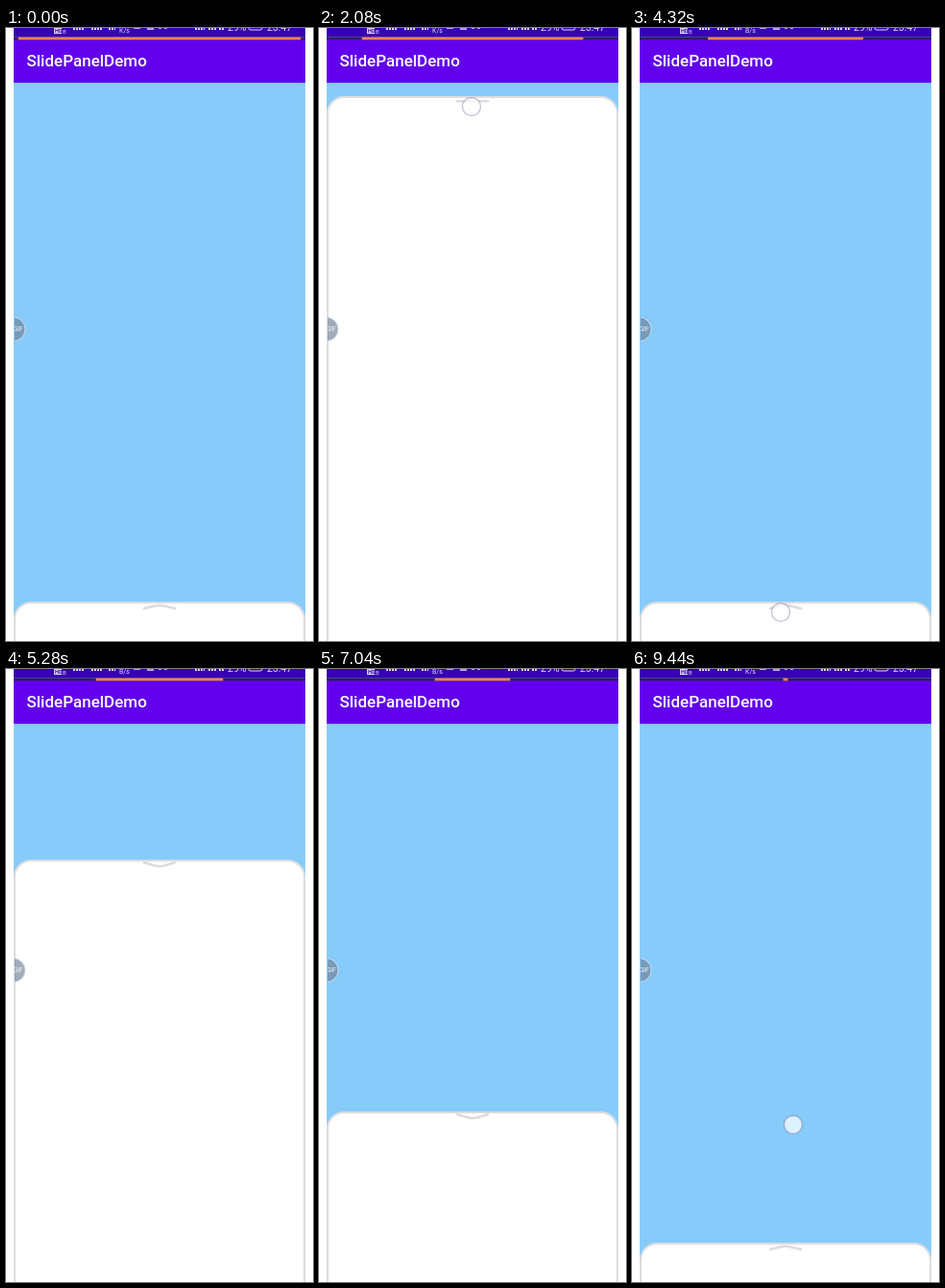
An HTML page for the animation above (9600 ms loop, 320 by 639 pixels).

```html
<!DOCTYPE html>
<html lang="en">
<head>
<meta charset="utf-8">
<title>Sliding sheet</title>
<style>
  html, body { margin: 0; width: 100%; height: 100%; overflow: hidden; background: #fff; }
  svg { display: block; width: 100%; height: 100%; }
  text { font-family: Roboto, sans-serif; fill: #fff; }
</style>
</head>
<body>
<svg viewBox="0 0 320 639">
  <defs>
    <clipPath id="screen"><rect x="8" width="304" height="639"/></clipPath>
    <clipPath id="edge"><rect x="9" width="303" height="639"/></clipPath>
  </defs>
  <g clip-path="url(#screen)">
    <rect x="8" width="304" height="639" fill="#87cbfa"/>
    <g id="sheet">
      <rect x="9" y="0" width="302" height="700" rx="17" fill="#fff" stroke="#dcdce0" stroke-width="2"/>
      <path id="arrow" fill="none" stroke="#dcdce0" stroke-width="2.6"/>
    </g>
    <rect x="8" y="57" width="304" height="1" fill="#5c86b8" opacity=".25"/>
    <rect x="8" y="12" width="304" height="45" fill="#6200ee"/>
    <text x="21.5" y="40" font-size="17" font-weight="500">SlidePanelDemo</text>

    <rect x="8" width="304" height="9.5" fill="#3700b3"/>
    <g opacity=".85">
      <rect x="50" y="-3" width="8" height="9" fill="#fff"/>
      <text x="51" y="5" font-size="5.5" font-weight="700" style="fill:#3700b3">HD</text>
      <text x="59" y="6" font-size="6">B</text>
      <path d="M70 .5h11M89 .5h11M107 .5h7" stroke="#fff" stroke-width="3" stroke-dasharray="2 1"/>
      <text id="rate" x="118" y="4.5" font-size="7">K/s</text>
      <path d="M133 0h7M147 1h7M159 0h3M165 0h3" stroke="#fff" stroke-width="1.6"/>
      <path d="M197 .5h10M211 .5h8M222 .5h6" stroke="#fff" stroke-width="3" stroke-dasharray="2 1"/>
      <text x="231" y="3" font-size="10.5">29%</text>
      <rect x="253" y="-5" width="14" height="7" rx="2" fill="none" stroke="#fff"/>
      <text x="272" y="3" font-size="10.5">23:47</text>
    </g>

    <rect x="8" y="9.5" width="304" height="2.8" fill="#2a2058"/>
    <rect id="bar" y="9.5" height="2.8" fill="#f5804e"/>

    <g clip-path="url(#edge)">
      <circle cx="7.5" cy="314" r="12.5" fill="#6e8096" fill-opacity=".65" stroke="#d5dfec" stroke-width=".9"/>
      <text x="12.8" y="316.3" font-size="6.5" text-anchor="middle" opacity=".9">GIF</text>
    </g>
    <circle id="touch" r="9.5" fill="#fff" fill-opacity=".72" stroke="#6a6494" stroke-opacity=".38" stroke-width="1.4"/>
  </g>
</svg>
<script>
const LOOP = 9600, STEP = 160, SETTLE = 480, FADE = 160;
const CLOSED = 599, OPEN = 72, GRIP = 10;

// The finger moves the sheet between two heights; on release it settles at rest.
const drags = [
  { start: 320, end: 960, from: CLOSED, to: 463, rest: OPEN, x: 163 },
  { start: 2080, end: 3040, from: OPEN, to: 544, rest: CLOSED, x: 159 },
  { start: 4320, end: 5120, from: CLOSED, to: 410, rest: OPEN, x: 155 },
  { start: 6560, end: 6880, from: OPEN, to: 237, rest: CLOSED, x: 159 },
  { start: 8000, end: 8480, from: CLOSED, to: 470, rest: CLOSED, x: 160 },
  { start: 9280, end: LOOP, from: CLOSED, to: CLOSED, rest: CLOSED, x: 168, grip: -124 }
];

const clamp = v => Math.min(1, Math.max(0, v));
const mix = (a, b, p) => a + (b - a) * p;
const easeOut = p => 1 - (1 - p) ** 2.4;

function set(id, attrs) {
  const node = document.getElementById(id);
  for (const name in attrs) node.setAttribute(name, attrs[name]);
}

function draw(t) {
  const drag = drags.findLast(d => d.start <= t) || drags[drags.length - 1];
  const held = t >= drag.start && t < drag.end;
  const finger = mix(drag.from, drag.to, clamp((t - drag.start) / (drag.end - drag.start)));
  const top = mix(finger, drag.rest, easeOut(clamp((t - drag.end) / SETTLE)));
  set('sheet', { transform: `translate(0 ${top})` });

  // The handle points up when closed, lies flat while dragged, else points down.
  const bend = top > CLOSED - 20 ? -2 : held ? 0 : 2.4;
  const tip = 4.2 + bend, side = 4.2 + bend * .42, ends = 4.2 - bend;
  set('arrow', { d: `M143 ${ends}L155 ${side}Q160 ${tip} 165 ${side}L177 ${ends}` });

  set('touch', {
    cx: drag.x,
    cy: finger + (drag.grip ?? GRIP),
    opacity: t < drag.start ? 0 : 1 - clamp((t - drag.end) / FADE)
  });

  const left = mix(12.8, 160, t / LOOP);
  set('bar', { x: left, width: 320 - 2 * left });
  document.getElementById('rate').textContent = t >= 4000 && t < 8000 ? 'B/s' : 'K/s';
}

const start = performance.now();
function frame() {
  const t = (performance.now() - start) % LOOP;
  draw(Math.floor(t / STEP) * STEP);
  requestAnimationFrame(frame);
}
frame();
</script>
</body>
</html>
```
